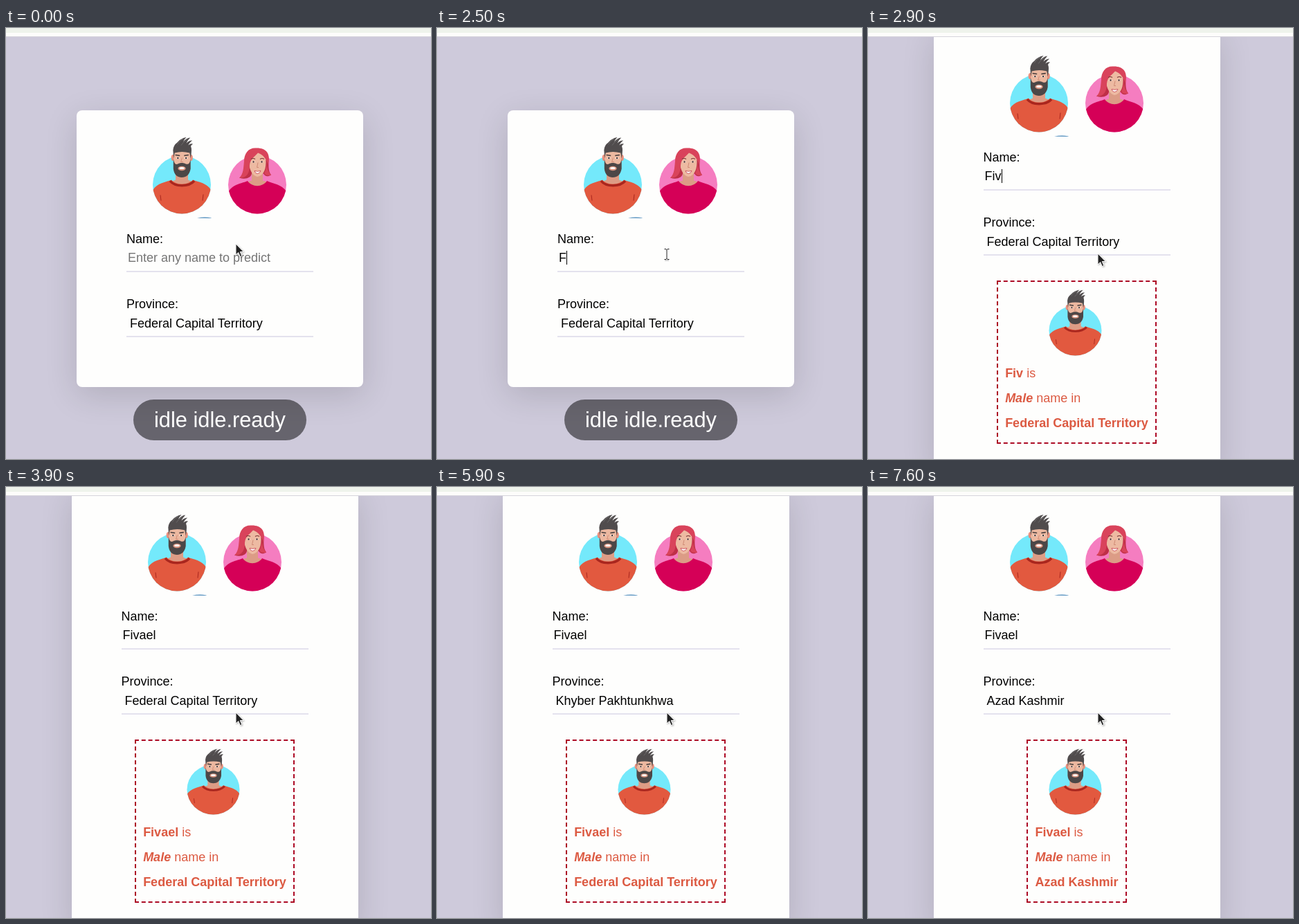
Animation, 614 px wide and 623 px high, one loop 8000 ms. Source, as an HTML page:

```html
<!DOCTYPE html>
<html lang="en">
<head>
<meta charset="utf-8">
<title>Name predictor</title>
<style>
html, body { margin: 0; width: 100%; height: 100%; overflow: hidden; }
body { position: relative; background: #cecadb; color: #000; font: 18px/20px "Liberation Sans", Arial, sans-serif; }
svg { position: absolute; left: 0; top: 0; overflow: visible; }
.bar { position: absolute; left: 0; top: 0; width: 100%; height: 7px; background: #eff3ec; border-bottom: 5px solid #fdfdfb; box-shadow: 0 1px #d6d4dc; }
.card { position: absolute; width: 414px; border-radius: 8px; background: #fefefd; box-shadow: 0 12px 48px rgba(0, 0, 0, .14); white-space: nowrap; }
.card > * { position: absolute; }
.label { left: 72px; }
.rule { left: 72px; width: 270px; height: 2px; background: #e4e2ee; }
#field { left: 74px; top: 203px; height: 20px; }
#hint { position: absolute; left: 0; top: 0; color: #757575; }
#caret { position: absolute; left: 100%; top: 0; width: 1px; height: 20px; background: #000; }
#wave { position: absolute; left: 0; top: 18px; width: 100%; height: 3px; overflow: hidden; }
#province { left: 77px; top: 298px; }
#pill { left: 82px; top: calc(100% + 18px); width: 250px; height: 59px; border-radius: 30px; background: rgba(0, 0, 0, .5); color: #fff; font-size: 30.8px; line-height: 59px; text-align: center; }
.slot { left: 0; top: 364px; width: 414px; display: flex; justify-content: center; }
.box { border: 2px dashed #ac0a24; padding: 10px; color: #dc5a42; line-height: 36px; }
.pic { position: relative; width: 90px; height: 100px; margin: 0 auto 4px; box-sizing: border-box; }
.broken { border: 1px solid #c0c0c0; }
#arrow { filter: drop-shadow(1px 1px 1px rgba(0, 0, 0, .3)); }
</style>
</head>
<body>
<svg width="0" height="0">
  <defs>
    <clipPath id="disc"><circle r="42"/></clipPath>
    <g id="man">
      <circle r="42" fill="#74e9fb"/>
      <path d="M-9-20H9V-7L14-5Q0 8-14-5L-9-7Z" fill="#dd9c85"/>
      <path clip-path="url(#disc)" fill="#e2593f" d="M-44 12C-38-3-24-3-15-7C-8 1 8 1 16-7C25-3 38-3 44 11V50H-44Z"/>
      <path d="M-17-5.500C-10 3.500 10 3.500 18-5.500" fill="none" stroke="#a9261e" stroke-width="3.400"/>
      <path d="M-31 15L-30 23M31 14L30 23" stroke="#a9261e" stroke-width="1"/>
      <g transform="scale(.94 1)">
        <g fill="#e78f7d"><ellipse cx="-13.500" cy="-39" rx="2.800" ry="4.500"/><ellipse cx="14" cy="-39" rx="2.800" ry="4.500"/></g>
        <path d="M-12.500-50H13V-25Q12-12 0-12Q-12-12-12.500-25Z" fill="#ecb8a0"/>
        <path fill="#4c4747" d="M-13-37C-11-29-9-29-6-30C-3-32 3-32 6-30C10-29 12-30 13.500-37V-23C12-14 6-10.500 0-10.500C-6-10.500-12-14-13-23Z"/>
        <ellipse cy="-23.500" rx="6" ry="3.200" fill="#d99581"/>
        <ellipse cy="-24" rx="4" ry="1.500" fill="#fff"/>
        <g fill="#fff"><ellipse cx="-6" cy="-38.500" rx="2.300" ry="1.200"/><ellipse cx="6.500" cy="-38.500" rx="2.300" ry="1.200"/></g>
        <g fill="#3d3030"><circle cx="-6" cy="-38.500" r="1.300"/><circle cx="6.500" cy="-38.500" r="1.300"/></g>
        <path d="M-10-43L-3-42M10.500-43L3.500-42" stroke="#463d3d" stroke-width="1.700"/>
        <path d="M.5-39L-1.500-33H2" fill="none" stroke="#cf8a75" stroke-width="1"/>
        <path fill="#504c4d" d="M-12.500-38L-13.500-50Q-13-57-7-61Q-2-67 7-68.500Q3-65 2-62Q7-67.500 13-68Q8-63 7-60Q11-64 16-64Q11-60 10-57Q13-60 17-59Q14-57 14-55Q16-51 13.500-38L12-46Q0-49-11-46Z"/>
        <path d="M-7-58Q-4-64 2-66M-1-57Q2-62 8-65" fill="none" stroke="#777" stroke-width=".7"/>
      </g>
    </g>
    <g id="woman">
      <circle r="42" fill="#f57dc0"/>
      <path fill="#bf2f47" d="M-18-36C-18-22-21-12-26-10C-17-7-9-10-8-16L9-16C11-12 15-11 20-14C15-21 17-28 16-36Z"/>
      <path d="M-8-18H8V-6L14-4Q0 8-14-4L-8-6Z" fill="#dc9c86"/>
      <path clip-path="url(#disc)" fill="#d50057" d="M-44 15C-38-1-24-1-14-5.500C-8 4 8 4 14-5.500C24-1 38 0 44 13V50H-44Z"/>
      <path d="M-12-38Q-11-48 1-48Q13-46 12.500-32Q12-14 0-11.500Q-11-15-12-32Z" fill="#edbaa2"/>
      <path fill="#d9435b" d="M-3-53C12-54 20-46 16-29C13-37 9-43 1-46C-4-40-10-38-11-28C-11-17-15-9-26-10C-20-15-20-24-19-34C-19-45-13-53-3-53Z"/>
      <path fill="#d9435b" d="M13-34Q14-20 20-14Q12-12 10-17Q14-23 13-34Z"/>
      <path d="M-9-37Q-6-39-3-37M4-37Q7-39 10-37" fill="none" stroke="#7a3434" stroke-width="1.100"/>
      <g fill="#fff"><ellipse cx="-5.500" cy="-33" rx="2.200" ry="1.100"/><ellipse cx="6.500" cy="-33" rx="2.200" ry="1.100"/></g>
      <g fill="#4b3030"><circle cx="-5.500" cy="-33" r="1.200"/><circle cx="6.500" cy="-33" r="1.200"/></g>
      <path d="M1-32L-.5-25H2" fill="none" stroke="#cf8a75" stroke-width="1"/>
      <path d="M-4-20Q0-18.500 5-20Q3.500-16 0-16Q-3-16.500-4-20Z" fill="#fff" stroke="#c63a4a" stroke-width=".8"/>
    </g>
  </defs>
</svg>

<div class="card" id="card">
  <svg width="414" height="180">
    <use href="#man" x="152" y="107.500"/>
    <use href="#woman" x="261" y="107.500"/>
    <path d="M174 155.800Q184 153.500 194.500 155.400V156Z" fill="#4f8dbd"/>
  </svg>
  <div class="label" style="top:176px">Name:</div>
  <div id="field"><span id="typed"></span><span id="hint">Enter any name to predict</span><span id="wave"><svg width="80" height="3"><path id="zigzag" fill="none" stroke="#e0383e"/></svg></span><i id="caret"></i></div>
  <div class="rule" style="top:232px"></div>
  <div class="label" style="top:270px">Province:</div>
  <div id="province"></div>
  <div class="rule" style="top:326px"></div>
  <div class="slot" id="empty"><div class="box"><div class="pic broken"><svg width="17" height="17" viewBox="0 0 17 17">
    <path d="M1.500 1.500H11L15.500 6V9L5 15.500H1.500Z" fill="#c5daf4" stroke="#8a8d91"/>
    <path d="M11 1.500V6H15.500" fill="#fff" stroke="#8a8d91"/>
    <path d="M3 7Q5 3 8 7Z" fill="#fff"/>
    <path d="M2 15V12Q6 7 11 11L5 15Z" fill="#4c9c46"/>
    <path d="M7 15.500L15.500 10V15.500Z" fill="#e9f1ea" stroke="#8a8d91"/>
  </svg></div></div></div>
  <div class="slot" id="result"><div class="box">
    <div class="pic"><svg width="90" height="100"><use href="#man" transform="translate(43.500 60.300) scale(.905 .86)"/></svg></div>
    <div><b id="who"></b> is</div>
    <div><b><i>Male</i></b> name in</div>
    <div><b id="where"></b></div>
  </div></div>
  <div id="pill">idle idle.ready</div>
</div>
<div class="bar"></div>

<svg id="arrow" width="14" height="22" style="left:331px"><path d="M1 1V17L4.700 13.500L7.300 19.500L9.800 18.500L7.300 12.500H12.200Z" fill="#222" stroke="#fff"/></svg>
<svg id="beam" width="9" height="18" style="left:328px">
  <path d="M0 .5H8M4 0V17M0 16.500H8" fill="none" stroke="#fff" stroke-width="2.400"/>
  <path d="M.5.5H3L4 1.500L5 .5H7.500M4 1V15M.5 15.500H3L4 14.500L5 15.500H7.500" fill="none" stroke="#222"/>
  <path d="M1 17H7" stroke="#aaa"/>
</svg>

<script>
const LOOP = 8000, NAME = "Fivael";
const CAPITAL = "Federal Capital Territory", KHYBER = "Khyber Pakhtunkhwa",
      GILGIT = "Gilgit Baltistan", AZAD = "Azad Kashmir";
const HEIGHT = { none: 400, empty: 528, full: 636 };

// Each step changes some of the state from its time on.
const STEPS = [
  [0, { chars: 0, caret: false, wave: false, result: "none", province: CAPITAL, where: CAPITAL, cursor: "arrow", y: 311 }],
  [400, { cursor: "beam", y: 305 }],
  [600, { y: 311 }],
  [800, { y: 319 }],
  [1300, { caret: true }],
  [1900, { caret: false }],
  [2500, { chars: 1, caret: true }],
  [2600, { result: "empty", cursor: "arrow", y: 325 }],
  [2800, { chars: 2, result: "full" }],
  [2900, { chars: 3 }],
  [3100, { chars: 4 }],
  [3400, { chars: 5 }],
  [3500, { chars: 6 }],
  [3900, { caret: false }],
  [4300, { wave: true }],
  [5000, { caret: true }],
  [5100, { caret: false }],
  [5500, { wave: false }],
  [5900, { province: KHYBER }],
  [6500, { where: KHYBER }],
  [6700, { province: GILGIT }],
  [6900, { where: GILGIT }],
  [7500, { province: AZAD }],
  [7600, { where: AZAD }]
];

const $ = id => document.getElementById(id);
const show = (id, on) => { $(id).style.display = on ? "" : "none"; };

let zigzag = "M0 2.500";
for (let x = 2, up = true; x <= 80; x += 2, up = !up) zigzag += `L${x} ${up ? 0.5 : 2.5}`;
$("zigzag").setAttribute("d", zigzag);

function draw(s) {
  const h = HEIGHT[s.result], name = NAME.slice(0, s.chars);
  Object.assign($("card").style, {
    left: (s.result === "none" ? 102 : 94.5) + "px",
    top: 319 - h / 2 + "px",
    height: h + "px"
  });
  $("typed").textContent = $("who").textContent = name;
  $("province").textContent = s.province;
  $("where").textContent = s.where;
  show("hint", !name);
  show("caret", s.caret);
  show("wave", s.wave);
  show("empty", s.result === "empty");
  show("result", s.result === "full");
  for (const id of ["arrow", "beam"]) {
    show(id, s.cursor === id);
    $(id).style.top = s.y + "px";
  }
}

let last = 0;
function frame() {
  const t = performance.now() % LOOP;
  const due = STEPS.filter(([at]) => at <= t);
  if (due.length !== last) {
    last = due.length;
    draw(Object.assign({}, ...due.map(step => step[1])));
  }
  requestAnimationFrame(frame);
}
frame();
</script>
</body>
</html>
```
